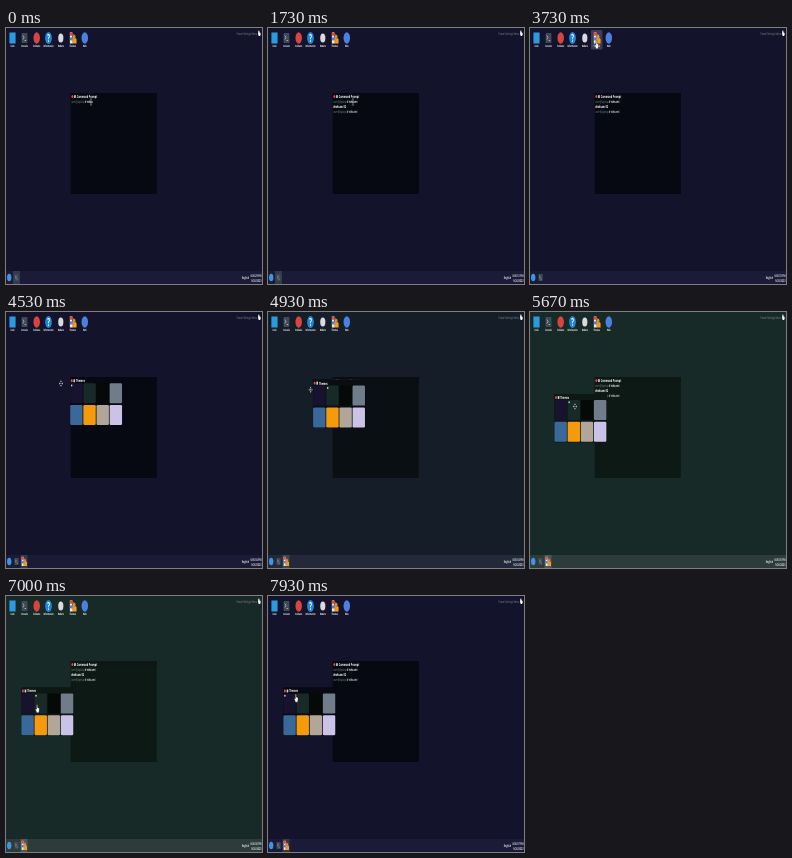
These frames come from a looping animation (256 px wide and 256 px high, 8 s). An HTML page with a canvas:

```html
<!DOCTYPE html>
<html lang="en">
<head>
<meta charset="utf-8">
<title>Desktop themes</title>
<style>
  html, body { margin: 0; width: 100%; height: 100%; overflow: hidden; background: #13132a; }
  canvas { display: block; width: 100vw; height: 100vh; }
</style>
</head>
<body>
<canvas id="stage"></canvas>
<script>
const LOOP = 8000, SIZE = 256;
const SX = 0.5625; // the 16:9 desktop is shown on a square stage
const canvas = document.getElementById("stage");
const ctx = canvas.getContext("2d");
let theme;

// Drawing helpers
function box(x, y, w, h, fill, r = 0) {
  ctx.fillStyle = fill;
  ctx.beginPath();
  ctx.roundRect(x, y, w, h, r);
  ctx.fill();
}
function oval(x, y, rx, ry, fill) {
  ctx.fillStyle = fill;
  ctx.beginPath();
  ctx.ellipse(x, y, rx, ry, 0, 0, 7);
  ctx.fill();
}
function shape(d, fill, stroke, width = 1) {
  const p = new Path2D(d);
  if (fill) { ctx.fillStyle = fill; ctx.fill(p); }
  if (stroke) { ctx.strokeStyle = stroke; ctx.lineWidth = width; ctx.stroke(p); }
}
function put(x, y, draw, scale = 1) {
  ctx.save();
  ctx.translate(x, y);
  ctx.scale(SX * scale, scale);
  draw();
  ctx.restore();
}
function write(x, y, str, { size = 3.9, weight = 600, fill = "#fff", align = "left" } = {}) {
  put(x, y, () => {
    ctx.font = `${weight} ${size}px "Open Sans", "Noto Sans", sans-serif`;
    ctx.textRendering = "geometricPrecision";
    ctx.textAlign = align;
    ctx.fillStyle = fill;
    ctx.fillText(str, 0, 0);
  });
}

// Icons, about 12 units wide around their centre
const disc = (fill, r = 5.8) => () => oval(0, 0, r, r, fill);
function consoleIcon() {
  box(-5.2, -5, 10.4, 10, "#3f4a56", 1);
  shape("M-3-2.5l2 2-2 2M0 2.5h3", null, "#c3ccd3", 0.9);
}
function paletteIcon() {
  shape("M-1.5 5.6l5.6-6.4 2.6 2.2v4.2z", "#f5a01c");
  shape("M-1.5 4l2.6-8 4 2-5 7z", "#ee8d2b");
  box(-5.2, -5.8, 4.4, 11.4, "#f0ebe6", 0.6);
  box(-5.2, -5.8, 4.4, 3.6, "#e5493a", 0.6);
  box(-5.2, -0.6, 4.4, 3, "#4a80d8");
}
function helpIcon() {
  oval(0, 0, 6, 6, "#1f86dd");
  ctx.font = '700 10px "Open Sans", sans-serif';
  ctx.textAlign = "center";
  ctx.fillStyle = "#fff";
  ctx.fillText("?", 0, 3.6);
}
const icons = [
  ["Code", 6.5, () => box(-5.5, -5.5, 11, 11, "#2a9be0")],
  ["Console", 18.5, consoleIcon],
  ["Solitaire", 30.7, disc("#d8453f")],
  ["Information", 42.5, helpIcon],
  ["Robots", 54.8, disc("#d9d9e2", 4.6)],
  ["Themes", 66.8, paletteIcon],
  ["Web", 78.8, disc("#4c7fe0")]
];

const pointers = {
  beam: () => shape("M-.9-3.2h1.8M0-3.2v6.4M-.9 3.2h1.8", null, "#d8d8d8", 0.7),
  hand: () => shape("M-1.2-3q.9-1.2 1.8 0v2.4l3 .9v2.4l-1 2h-3.4l-2.4-3.2 1-.9 1 .8z", "#fff", "#111", 0.5),
  move: () => {
    shape("M0-3.2l1.5 1.7h-3zM0 3.2l1.5-1.7h-3zM-3.6 0l1.7-1.5v3zM3.6 0l-1.7-1.5v3z", "#fff", "#111", 0.3);
    oval(0, 0, 0.7, 0.7, "#fff");
  }
};

// Motion tables: time, x, y
const mousePath = [
  [0, 85, 74], [2870, 85, 74], [3130, 80, 52], [3400, 70, 24], [3670, 66.5, 16],
  [3800, 66.5, 16], [4130, 79, 80], [4270, 80, 85], [4530, 55, 71.5], [4950, 42, 78],
  [5300, 42, 88], [5670, 45, 94.5], [6200, 31.3, 112], [7000, 31.3, 112],
  [7130, 24, 109], [7470, 23, 108], [7930, 28, 101.5]
];
const pickerPath = [
  [0, 64, 65.2], [4540, 64, 65.2], [4900, 46, 67], [5300, 32, 75], [5670, 24.3, 82], [6200, 15.2, 91.4]
];
const themes = [
  { bg: [19, 19, 43], bar: [27, 27, 56], body: [6, 8, 18], head: [7, 8, 18], on: [52, 58, 78] },
  { bg: [24, 42, 39], bar: [45, 59, 59], body: [13, 25, 20], head: [13, 23, 19], on: [75, 89, 91] }
];
const swatches = ["#17132e", "#182a27", "#050907", "#717c8b", "#39699b", "#f59b0b", "#b2a698", "#cac2e7"];
const slot = i => [0.2 + (i % 4) * 13.15, 6 + Math.floor(i / 4) * 21.8];

function ramp(t, a, b) {
  const u = Math.min(1, Math.max(0, (t - a) / (b - a)));
  return u * u * (3 - 2 * u);
}
function along(path, t) {
  const i = path.findIndex(p => p[0] > t);
  if (i < 0) return path[path.length - 1].slice(1);
  const [ta, xa, ya] = path[i - 1], [tb, xb, yb] = path[i];
  const u = (t - ta) / (tb - ta);
  return [xa + (xb - xa) * u, ya + (yb - ya) * u];
}
function blend(mix) {
  const out = {};
  for (const k in themes[0]) {
    out[k] = `rgb(${themes[0][k].map((v, i) => Math.round(v + (themes[1][k][i] - v) * mix))})`;
  }
  return out;
}

function openWindow(x, y, w, h, title, content) {
  ctx.save();
  ctx.translate(x, y);
  box(0, 0, w, h, theme.body, 0.6);
  box(0, 0, w, 6, theme.head, 0.6);
  oval(1.7, 3.5, 1, 1.6, "#e0444c");
  box(3.4, 2, 1.7, 3.1, "#c4c9d2", 0.4);
  write(6, 5, title, { weight: 700, size: 4 });
  content();
  ctx.restore();
}
function promptLine(y, cmd, fill) {
  write(0.5, y, "user@laptop:", { weight: 400, fill: "#738f7e" });
  write(14.2, y, "#", { fill });
  write(16.2, y, cmd, { fill });
}
function terminal(t) {
  const typed = t < 270 ? 4 : t < 330 ? 5 : 6;
  promptLine(10.4, "whoami".slice(0, typed), "#fff");
  if (t < 670) return;
  write(0.5, 15.2, "deskuser32", { weight: 700, size: 4 });
  promptLine(20.1, "whoami", "#d8dcdc");
  const blink = Math.floor((t - 670) / 532) % 2 === 0;
  if (blink && t < 3730) box(16.4, 16.3, 0.5, 4.5, "#fff");
}
function picker(t) {
  swatches.forEach((fill, i) => box(...slot(i), 12.4, 20, fill, 1.2));
  const [x, y] = slot(t >= 4750 && t < 7470 ? 1 : 0);
  oval(x + 1.5, y + 2.3, 0.7, 1, "#dfe4e6");
}
function desktop(t) {
  box(0, 0, SIZE, SIZE, theme.bg);
  if (t >= 3530 && t < 3930) box(61, 2, 11.5, 19.5, "#8c93a855", 1);
  for (const [name, x, draw] of icons) {
    put(x, 10, draw);
    write(x, 19, name, { size: 3, weight: 700, align: "center" });
  }
  write(251, 6.8, "Power Settings Menu", { size: 3.7, weight: 400, fill: "#858894", align: "right" });
  shape("M252.3 3l.8-.7.5 2.3 1 .5v2l-.6 1h-1.3l-.6-2z", "#fff");
}
function taskbar(t, open) {
  box(0, 243, SIZE, 13, theme.bar);
  oval(3.2, 249.5, 2.2, 3.8, "#3d96e4");
  if (t < 3700) box(7, 243, 7, 13, theme.on);
  put(10.6, 249.4, consoleIcon, 0.7);
  if (open) {
    box(14.5, 243, 7, 13, theme.on);
    put(18, 249.5, paletteIcon, 0.8);
  }
  const sec = 29 + Math.floor((t + 930) / 1000);
  const right = { align: "right", size: 3.8 };
  write(243, 251.2, "English", right);
  write(255.5, 249, `6:06:${sec} PM`, right);
  write(255.5, 253.7, "9/26/2023", right);
}

function paint(t) {
  const scale = window.devicePixelRatio || 1;
  const w = Math.round(innerWidth * scale), h = Math.round(innerHeight * scale);
  if (canvas.width !== w || canvas.height !== h) { canvas.width = w; canvas.height = h; }
  ctx.setTransform(w / SIZE, 0, 0, h / SIZE, 0, 0);

  theme = blend(ramp(t, 4750, 5150) - ramp(t, 7470, 7860));
  const open = t >= 3870;
  desktop(t);
  openWindow(64.7, 65, 86, 101, "Command Prompt", () => terminal(t));
  if (open) openWindow(...along(pickerPath, t), 52.6, 48.5, "Themes", () => picker(t));
  taskbar(t, open);
  const kind = t < 3000 ? "beam" : t >= 4270 && t < 6200 ? "move" : "hand";
  put(...along(mousePath, t), pointers[kind]);
}

const start = performance.now();
function tick() {
  paint((performance.now() - start) % LOOP);
  requestAnimationFrame(tick);
}
tick();
</script>
</body>
</html>
```
